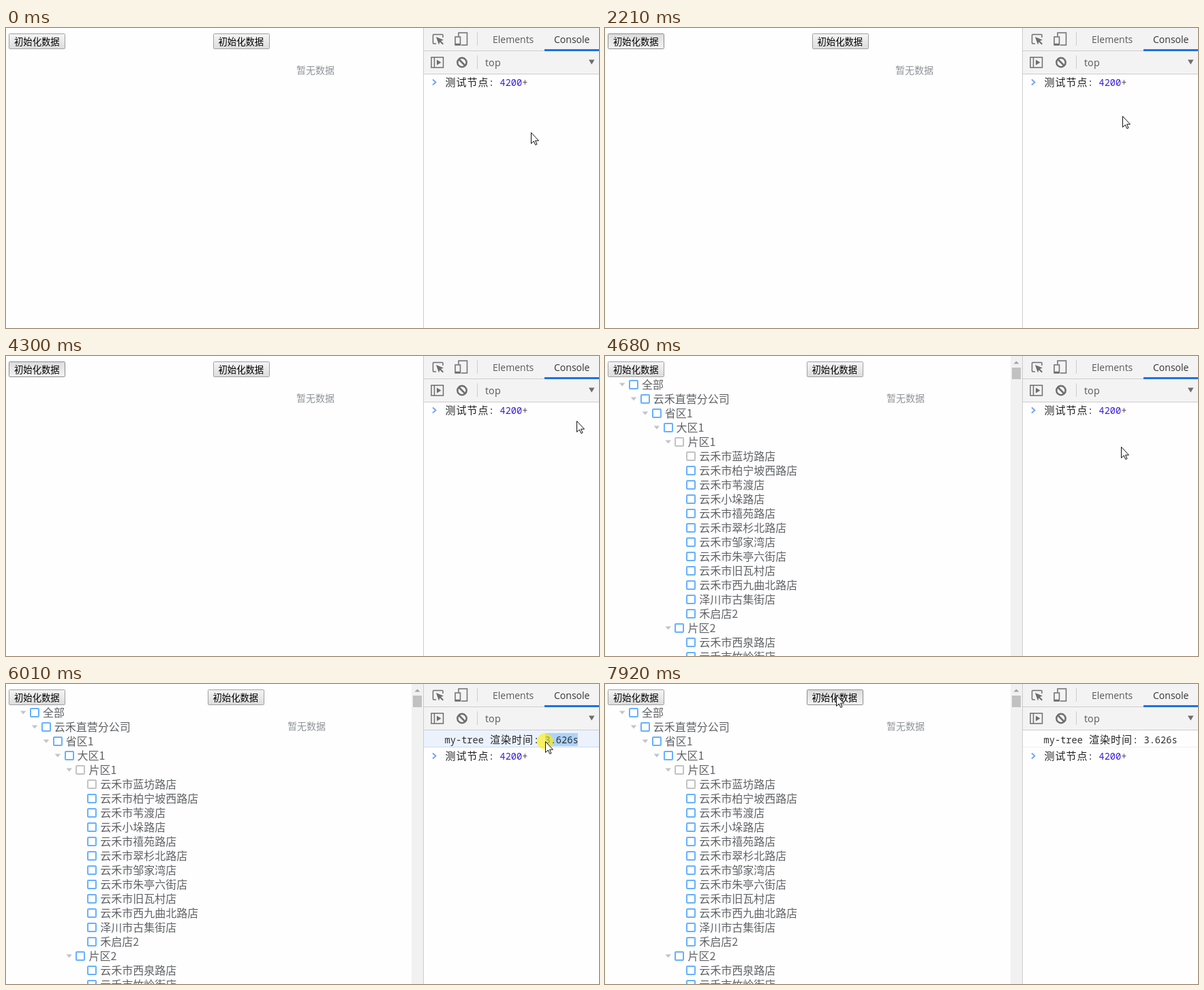
These frames come from a looping animation (870x440 px, 8000 ms). An HTML page:

```html
<!DOCTYPE html>
<html lang="zh">
<head>
<meta charset="utf-8">
<style>
  html, body { margin: 0; width: 100%; height: 100%; overflow: hidden; background: #fefefe; }
  svg { display: block; }
  text { white-space: pre; font-family: "Noto Sans CJK SC", "Noto Sans CJK", sans-serif; }
  .btn text { font-size: 13.33px; }
  .btn rect { fill: url(#up); stroke: #a0a0a0; }
  .btn.hover rect { stroke: #707070; }
  .btn.down rect { fill: url(#down); stroke: #8c8c8c; }
  .tree text { font-size: 16px; fill: #606266; }
  .ui { font: 14px "Open Sans", "Noto Sans", sans-serif; fill: #5a5a5a; }
  .mono { font: 13.7px "Noto Sans Mono", monospace; fill: #303030; }
  .log { font-size: 15px; letter-spacing: 1px; fill: #222; }
  .icon { fill: none; stroke: #6e6e6e; stroke-width: 1.5; }
</style>
</head>
<body>
<svg width="870" height="440" viewBox="0 0 870 440">
  <defs>
    <linearGradient id="up" x2="0" y2="1"><stop stop-color="#f5f5f5"/><stop offset="1" stop-color="#dcdcdc"/></linearGradient>
    <linearGradient id="down" x2="0" y2="1"><stop stop-color="#dcdcdc"/><stop offset="1" stop-color="#f3f3f3"/></linearGradient>
  </defs>

  <g id="first" class="btn"><rect x="4.5" y="8.5" width="82" height="22" rx="1"/><text x="12" y="25">初始化数据</text></g>
  <g id="second" class="btn"><rect x="304.5" y="8.5" width="82" height="22" rx="1"/><text x="311.5" y="25">初始化数据</text></g>
  <text id="empty" x="426" y="67" font-size="14" fill="#909399">暂无数据</text>

  <g id="tree" class="tree">
    <path d="M595 0h17v440h-17z" fill="#f1f1f1"/>
    <path d="M597 17h13v17h-13z" fill="#c1c1c1"/>
    <path d="M599.5 11.5l4-4 4 4z" fill="#a3a3a3"/>
  </g>

  <path d="M613 0h257v67H613z" fill="#f3f3f3"/>
  <path d="M612.5 0v440M613 33.5h257M613 67.5h257M691.5 6v20M691.5 40v20" stroke="#ccc" fill="none"/>
  <path d="M790 31h80v3h-80z" fill="#1a73e8"/>
  <g class="icon">
    <path d="M631 23h-3.5q-1 0-1-1V10.5q0-1 1-1H640q1 0 1 1V14"/>
    <path d="M664 12V7h12.5v18H668M659 13h7.5v12H659zM659 23.5h7"/>
    <path d="M624 43h17.5v15H624zM628.5 43v15"/>
    <g stroke-width="2.5"><circle cx="669" cy="50.5" r="6.7"/><path d="M664.5 46l9 9"/></g>
  </g>
  <path d="M631 13l11 4.5-4 1.5 4 4-1.5 1.5-4-4-1.5 4zM632 46.5l6.5 4-6.5 4zM855 46.5h8.5l-4.25 7z" fill="#6e6e6e"/>
  <text class="ui" x="714" y="22">Elements</text>
  <text class="ui" x="804" y="22" style="fill:#333">Console</text>
  <text class="ui" x="703" y="56" style="font-size:14.5px">top</text>

  <g id="log">
    <path id="row" d="M613 68h257v24H613z" fill="#ebf2fc"/>
    <path id="rule" d="M613 92.5h257"/>
    <path id="pick" fill="#acd3fb"/>
    <text class="mono" x="643.5" y="87">my-tree</text>
    <text class="log" x="710" y="87">渲染时间</text>
    <text class="mono" x="774" y="87">: 3.626s</text>
  </g>
  <g id="prompt">
    <path d="M626 75.5l4.5 4-4.5 4" fill="none" stroke="#6ea2f7" stroke-width="1.8"/>
    <text class="log" x="644.5" y="85">测试节点</text>
    <text class="mono" x="708" y="85">: <tspan fill="#3a22d8">4200</tspan><tspan fill="#5c4656">+</tspan></text>
  </g>

  <circle id="halo" r="12" fill="#ffef00" opacity=".6"/>
  <path id="cursor" d="M.5.5V16.500L4.300 13 6.800 18.500 9 17.600 6.600 12.200H11.500z" fill="#fff" stroke="#111"/>
</svg>
<script>
const $ = id => document.getElementById(id);
const LOOP = 8000, PRESS = 1060, READY = 4680, LOGGED = 4760;
const DRAG = 5600, DROP = 6240, CLEAR = 7150, AGAIN = 7840;

// Tree rows: depth, label; a leading "-" marks a disabled box
const city = "云禾市";
const shops = ["-" + city + "蓝坊路店", city + "柏宁坡西路店", city + "苇渡店", "云禾小垛路店",
  city + "禧苑路店", city + "翠杉北路店", city + "邹家湾店", city + "朱亭六街店", city + "旧瓦村店",
  city + "西九曲北路店", "泽川市古集街店", "禾启店2"];
const leaf = name => [5, name];
const rows = [[0, "全部"], [1, "云禾直营分公司"], [2, "省区1"], [3, "大区1"], [4, "-片区1"],
  ...shops.map(leaf), [4, "片区2"], ...[city + "西泉路店", city + "竹岭街店"].map(leaf)];

$("tree").insertAdjacentHTML("beforeend", rows.map(([depth, label], i) => {
  const x = 54 + 16.87 * depth, y = 42 + 21 * i, off = label[0] === "-";
  const caret = depth < 5 ? `<path d="M${x - 33} ${y - 2.5}h8.5l-4.25 5z" fill="#c0c4cc"/>` : "";
  return `${caret}<rect x="${Math.round(x - 19) + 1}" y="${y - 6}" width="12" height="12" rx="1" fill="#fff"
    stroke="${off ? "#c3c3c3" : "#66b1ff"}" stroke-width="2"/><text x="${x}" y="${y + 6}">${label.replace("-", "")}</text>`;
}).join(""));

// Pointer stops: time, x, y; a fourth value means circling there with that many extra turns
const stops = [
  [0, 770, 153], [760, 70, 28], [910, 69, 27], [1370, 69, 27], [1750, 770, 110],
  [2210, 759, 132, 0], [3530, 797, 107, 2], [READY, 757, 132, 1], [5310, 846, 82, 1],
  [DRAG, 839, 84], [6010, 790, 84], [DROP, 790, 84], [6390, 795, 180], [6530, 765, 97],
  [6690, 824, 178], [CLEAR, 824, 181], [7650, 339, 16], [LOOP, 339, 16]];
const HUB = [800, 126], TURN = 2 * Math.PI;

const mix = (a, b, u) => a + (b - a) * u;

function circle([, ax, ay], [, bx, by, turns], u) {
  const polar = (x, y) => [Math.hypot(x - HUB[0], y - HUB[1]), Math.atan2(y - HUB[1], x - HUB[0])];
  const [r0, from] = polar(ax, ay), [r1, to] = polar(bx, by);
  const sweep = (to - from + TURN) % TURN + turns * TURN;
  const r = mix(r0, r1, u) + 15 * Math.sin(Math.PI * u), angle = from + sweep * u;
  return [HUB[0] + r * Math.cos(angle), HUB[1] + r * Math.sin(angle)];
}

function pointer(t) {
  const i = stops.findIndex(s => s[0] > t), a = stops[i - 1], b = stops[i];
  const u = (t - a[0]) / (b[0] - a[0]), ease = u * u * (3 - 2 * u);
  const spot = b.length > 3 ? circle(a, b, u) : [mix(a[1], b[1], ease), mix(a[2], b[2], ease)];
  return spot.map(Math.round);
}

const sampled = t => Math.max(0, Math.floor((t + 22) * 13 / 1000) * 1000 / 13 - 15);

const show = (id, on) => $(id).style.display = on ? "" : "none";
const move = (id, x, y) => $(id).setAttribute("transform", `translate(${x} ${y})`);
const style = (id, state) => $(id).setAttribute("class", "btn " + state);

function draw(t) {
  const within = (a, b) => t >= a && t < b;
  const ready = t >= READY, logged = t >= LOGGED, hover = within(5460, 6300);
  const [x, y] = pointer(sampled(t));

  style("first", within(760, PRESS) ? "hover" : within(PRESS, READY) ? "down" : "");
  style("second", t >= AGAIN ? "down" : t >= 7600 ? "hover" : "");
  move("second", ready ? -8 : 0, 0);
  move("empty", ready ? -13 : 0, 0);
  show("tree", ready);

  show("log", logged);
  show("row", hover);
  $("rule").setAttribute("stroke", hover ? "#c9dcf3" : "#f0f0f0");
  show("pick", within(DRAG, CLEAR));
  $("pick").setAttribute("d", `M839 72H${t < DROP ? x : 790}V91H839z`);
  move("prompt", 0, logged ? 26 : 0);

  show("halo", within(DRAG, DROP) || [PRESS, CLEAR, AGAIN].some(c => within(c, c + 80)));
  move("halo", x, y);
  move("cursor", x, y);
}

const start = performance.now();
function tick() {
  draw((performance.now() - start) % LOOP);
  requestAnimationFrame(tick);
}
tick();
</script>
</body>
</html>
```
